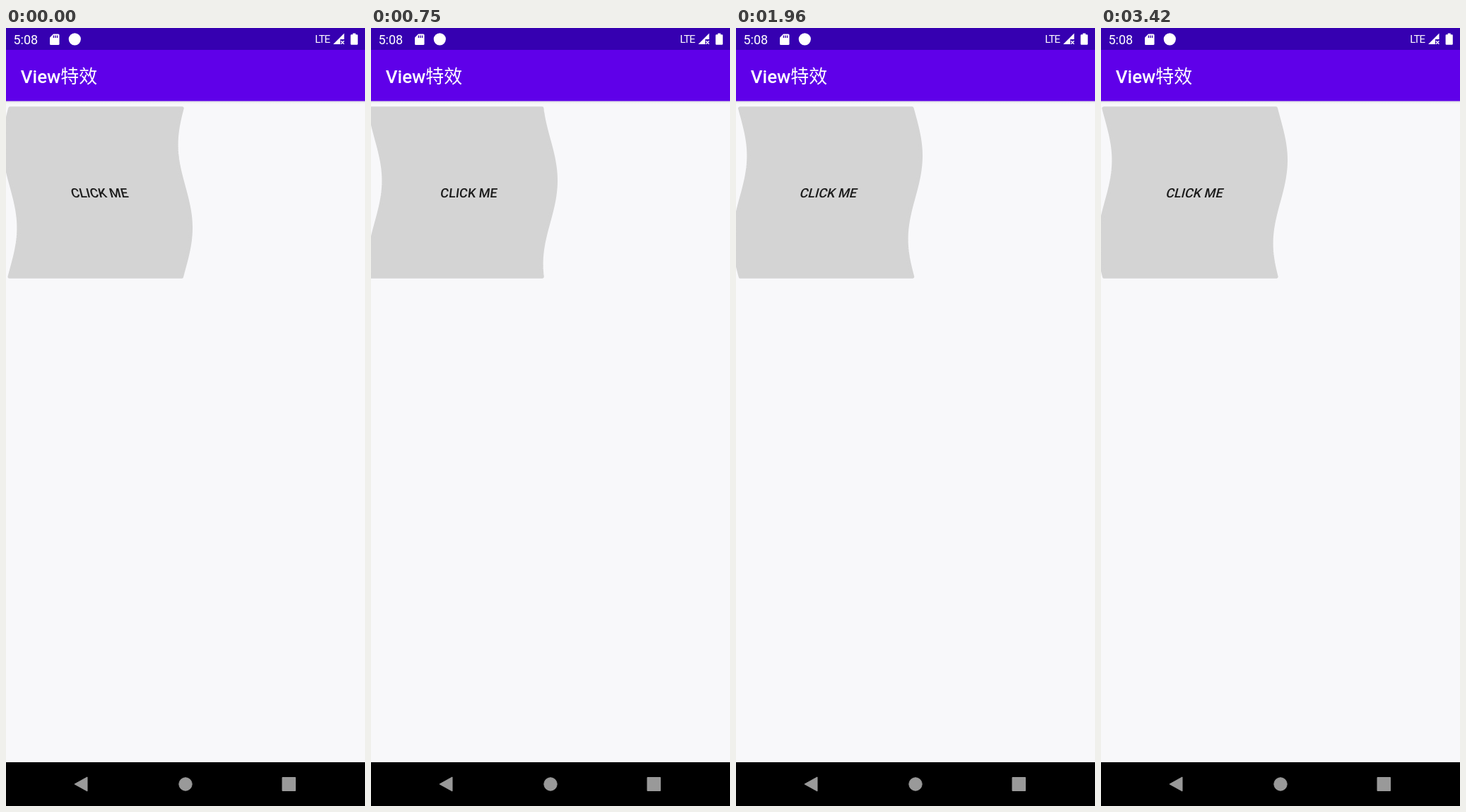
An HTML page that plays this animation: 508x1102 px, repeating every 3.46 s.

```html
<!DOCTYPE html>
<html lang="zh">
<head>
<meta charset="utf-8">
<title>View特效</title>
<style>
  html, body { margin: 0; width: 100%; height: 100%; overflow: hidden; background: #f8f8fa; }
  svg { display: block; width: 100%; height: 100%; }
  text { font-family: Roboto, 'Noto Sans CJK SC', 'Noto Sans CJK', sans-serif; fill: #fff; }
  #label { font-size: 18.1px; font-weight: 500; fill: #1b1b1b; text-anchor: middle; }
  #face { fill: #d4d4d4; stroke: #d4d4d4; stroke-width: 5; stroke-linejoin: round; }
</style>
</head>
<body>
<svg viewBox="0 0 508 1102">
  <defs>
    <linearGradient id="shade" x2="0" y2="1">
      <stop offset="0" stop-color="#d9d9de"/>
      <stop offset="1" stop-color="#f8f8fa"/>
    </linearGradient>
  </defs>
  <rect width="508" height="1102" fill="#f8f8fa"/>
  <rect y="103" width="508" height="4" fill="url(#shade)"/>

  <path id="face"/>
  <text id="label" x="129.6" y="240.4">CLICK ME</text>

  <!-- status bar -->
  <rect width="508" height="31.5" fill="#3600b1"/>
  <text x="10.5" y="22.5" font-size="18">5:08</text>
  <path fill="#fff" d="M67 8.5h7q1.5 0 1.5 1.5v12.5q0 1.5-1.5 1.5h-10.5q-1.5 0-1.5-1.5V13.5z"/>
  <path stroke="#3600b1" stroke-width="1.4" d="M67.4 10.5v3.6M70 10.5v3.6M72.6 10.5v3.6"/>
  <circle cx="97.3" cy="15.8" r="8.6" fill="#fff"/>
  <text x="437.3" y="21.3" font-size="15" letter-spacing="-.9">LTE</text>
  <path fill="#fff" d="M478.5 7.5v8.5h-5.5v7H463z"/>
  <path stroke="#fff" stroke-width="1.4" d="M474 18.3l4.4 4.4m0-4.4l-4.4 4.4"/>
  <path fill="#fff" d="M490.7 9.2v-1.7h4v1.7h1.9q1.2 0 1.2 1.2v12.2q0 1.2-1.2 1.2h-7.8q-1.2 0-1.2-1.2V10.4q0-1.2 1.2-1.2z"/>

  <!-- title bar -->
  <rect y="31" width="508" height="72.5" fill="#5f00e9"/>
  <text x="20.8" y="77.6" font-size="25.9" font-weight="500">View<tspan font-weight="400">特效</tspan></text>

  <!-- navigation bar -->
  <rect y="1040" width="508" height="62" fill="#000"/>
  <g fill="#999" stroke="#999" stroke-linejoin="round">
    <path d="M97 1071l18-10v20z"/>
    <circle cx="254" cy="1071" r="9.2"/>
    <rect x="391" y="1061.5" width="18.5" height="19"/>
  </g>
</svg>
<script>
  const LOOP = 3460, AMPLITUDE = 10.2, WAVELENGTH = 236;
  const LEFT = 7.7, RIGHT = 251.3, TOP = 113.8, BOTTOM = 352.3, TEXT_Y = 234;

  // [time in ms, y of a wave crest]
  const crests = [
    [0, 283], [250, 308], [750, 452], [1500, 566],
    [2380, 732], [2920, 818], [3420, 895], [LOOP, 901]
  ];
  const face = document.getElementById('face');
  const label = document.getElementById('label');
  const wave = 2 * Math.PI / WAVELENGTH;

  function crestAt(time) {
    const i = crests.findIndex(([t]) => t > time);
    const [t0, y0] = crests[i - 1], [t1, y1] = crests[i];
    return y0 + (y1 - y0) * (time - t0) / (t1 - t0);
  }

  function draw(time) {
    const crest = crestAt(time);
    const shift = y => AMPLITUDE * Math.cos(wave * (y - crest));
    const left = [], right = [];
    const rows = 60;
    for (let i = 0; i <= rows; i++) {
      const y = TOP + (BOTTOM - TOP) * i / rows;
      const point = x => `${(x + shift(y)).toFixed(2)} ${y.toFixed(2)}`;
      right.push(point(RIGHT));
      left.unshift(point(LEFT));
    }
    face.setAttribute('d', `M${[...right, ...left].join('L')}Z`);

    const slope = -AMPLITUDE * wave * Math.sin(wave * (TEXT_Y - crest));
    label.setAttribute('transform',
      `matrix(1 0 ${slope} 1 ${shift(TEXT_Y) - slope * TEXT_Y} 0)`);
  }

  const start = performance.now();
  function tick() {
    draw((performance.now() - start) % LOOP);
    requestAnimationFrame(tick);
  }
  draw(0);
  requestAnimationFrame(tick);
</script>
</body>
</html>
```
